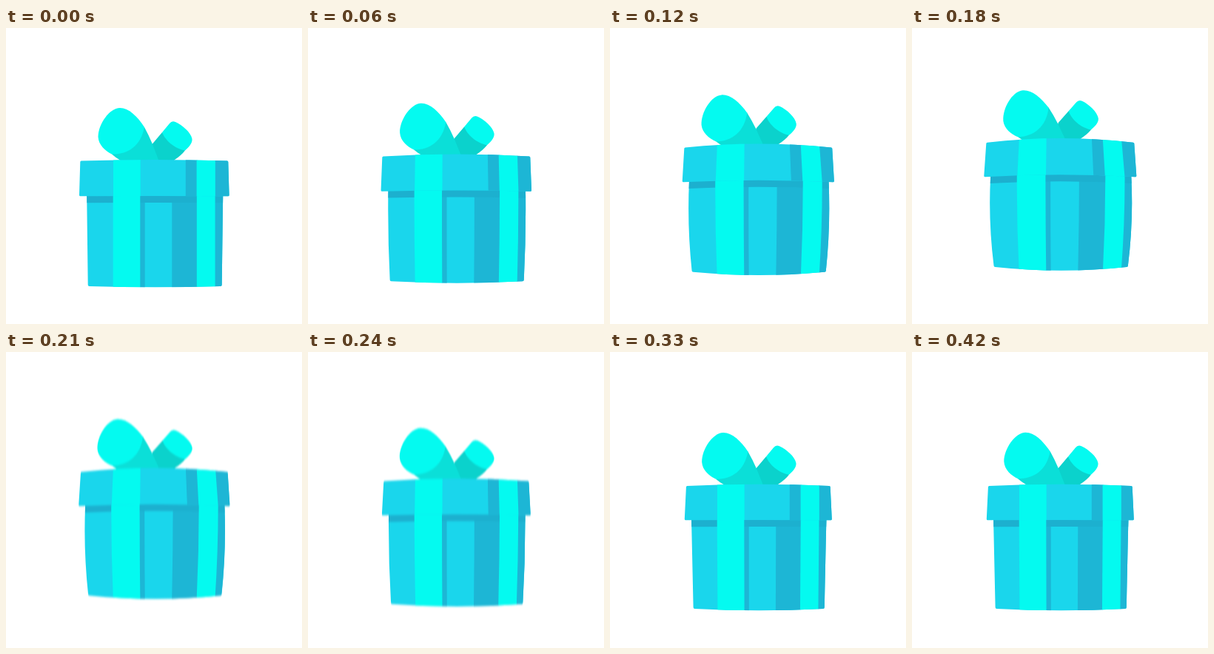
Recreate the animation shown at these times as an HTML page. Size 400x400 px, loop 0.54 s.

```html
<!DOCTYPE html>
<html lang="en">
<head>
<meta charset="utf-8">
<title>Gift box</title>
<style>
  html, body { margin: 0; width: 100%; height: 100%; overflow: hidden; background: #fff; }
  svg { display: block; width: 100%; height: 100%; }
</style>
</head>
<body>
<svg viewBox="0 0 400 400">
  <defs>
    <clipPath id="bodyClip"><path id="bodyEdge"/></clipPath>
    <clipPath id="lidClip"><path id="lidEdge"/></clipPath>
    <filter id="smear" filterUnits="userSpaceOnUse" x="0" y="0" width="400" height="400" color-interpolation-filters="sRGB">
      <feGaussianBlur id="smearAmount" stdDeviation="0"/>
    </filter>
  </defs>
  <g id="gift">
    <g id="bow">
      <g id="loopR">
        <path fill="#0bd2cc" d="M211 141L197.500 157L190 190H212L228 178Q237 172 242 165.500Z"/>
        <path fill="#04faf0" d="M211 141L221 129Q224 125 229 127C238 131 250 141 251.500 150C252 156 247 161 242 165.500C228 163 215 152 211 141Z"/>
      </g>
      <g id="loopL">
        <path fill="#0bdfd8" d="M187 134Q193 145 198 157L206 178L210 190H165L154 178.500Q148 175 143 170.500Z"/>
        <path fill="#04faf0" d="M124.500 147C124.500 130 140 108 154 108C166 108 177 119 187 134C182 160 164 171 143 170.500C134 166 125 158 124.500 147Z"/>
      </g>
    </g>
    <g id="body" clip-path="url(#bodyClip)"></g>
    <g id="lid" clip-path="url(#lidClip)"></g>
  </g>
</svg>
<script>
const LOOP = 540, STEP = 30, LAST = 420, PEAK = 180, LAND = 270;
const LIGHT = '#1ad6ec', DARK = '#1db6d5', SHADE = '#1cb0cf', RIBBON = '#04faf0';
const LID_X = 200.3, BODY_X = 201.2;

const $ = id => document.getElementById(id);
const span = (t, a, b) => Math.min(1, Math.max(0, (t - a) / (b - a)));
const ease = u => u * u * (3 - 2 * u);

function addPath(parent, attrs) {
  const p = document.createElementNS('http://www.w3.org/2000/svg', 'path');
  for (const k in attrs) p.setAttribute(k, attrs[k]);
  parent.appendChild(p);
  return p;
}

function addStrips(parent, list) {
  return list.map(([from, to, fill]) => ({ from, to, el: addPath(parent, { fill }) }));
}

const bodyStrips = addStrips($('body'), [
  [60, 340, LIGHT], [181, 187.7, DARK], [224.3, 258.5, DARK], [282, 340, DARK]
]);
const shade = addPath($('body'), { fill: 'none', stroke: SHADE, 'stroke-width': 18 });
bodyStrips.push(...addStrips($('body'), [[144.7, 181.3, RIBBON], [257.8, 282.6, RIBBON]]));
const lidStrips = addStrips($('lid'), [
  [60, 340, LIGHT], [242.8, 258.5, DARK], [282, 340, DARK],
  [145, 181.7, RIBBON], [257.6, 282.8, RIBBON]
]);

// box outline with slightly rounded corners and curved top, sides and base;
// top and base are { half, y, mid }: half width, corner height, middle height
function outline(cx, top, base, puff, r) {
  const l = cx - top.half, R = cx + top.half, bl = cx - base.half, bR = cx + base.half;
  const midY = (top.y + base.y) / 2, side = (top.half + base.half) / 2 + puff;
  return `M${l} ${top.y + r}Q${l} ${top.y} ${l + r} ${top.y}` +
    `Q${cx} ${2 * top.mid - top.y} ${R - r} ${top.y}Q${R} ${top.y} ${R} ${top.y + r}` +
    `Q${cx + side} ${midY} ${bR} ${base.y - r}Q${bR} ${base.y} ${bR - r} ${base.y}` +
    `Q${cx} ${2 * base.mid - base.y} ${bl + r} ${base.y}Q${bl} ${base.y} ${bl} ${base.y - r}` +
    `Q${cx - side} ${midY} ${l} ${top.y + r}Z`;
}

// vertical bands, spread sideways by s0 at the top and s1 at the bottom
function drawStrips(strips, y0, y1, s0, s1, puff) {
  const at = (x, s) => x + s * (x - 196) * .056;
  const mid = x => (at(x, s0) + at(x, s1)) / 2 + puff * (x - 200) / 92;
  const my = (y0 + y1) / 2;
  for (const { from, to, el } of strips) {
    el.setAttribute('d',
      `M${at(from, s0)} ${y0}H${at(to, s0)}Q${mid(to)} ${my} ${at(to, s1)} ${y1}` +
      `H${at(from, s1)}Q${mid(from)} ${my} ${at(from, s0)} ${y0}Z`);
  }
}

function draw(t) {
  const up = span(t, 0, PEAK), down = span(t, PEAK, LAND);
  const pinch = ease(down), hop = ease(up) - pinch;
  const settle = ease(span(t, LAND, LAST));
  const bulge = hop * (1.5 - .5 * hop), puff = 5.5 * bulge;
  const smear = 3.2 * (up * (1 - up) + 2 * down * (1 - down));

  const edge = (half, mid, sag) => ({ half, mid, y: mid + sag });
  const lidTop = edge(100 - 2.6 * pinch, 178 - 29 * hop + .8 * pinch, 1.5 + 4.2 * bulge + .6 * pinch);
  const lidBase = edge(101.3 + 1.7 * hop - 1.8 * pinch, 227 - 28.7 * hop, .3 + 2.7 * bulge);
  const bodyTop = edge(92 + 3 * hop - .8 * pinch, lidBase.mid - 4, lidBase.y - lidBase.mid);
  const sag = 1.2 + 3.6 * bulge + pinch;
  const bodyBase = edge(90.5 + .2 * hop - 1.9 * pinch, 349 - 26 * hop - 2 * pinch + sag, -sag);

  $('bodyEdge').setAttribute('d', outline(BODY_X, bodyTop, bodyBase, puff, 2));
  $('lidEdge').setAttribute('d', outline(LID_X, lidTop, lidBase, 0, 1.5));
  drawStrips(bodyStrips, lidBase.mid - 6, bodyBase.mid + 2, bulge, -.25 * pinch, puff * .6);
  drawStrips(lidStrips, lidTop.mid - 2, lidBase.y + 2, 0, bulge, 0);
  shade.setAttribute('d', `M${LID_X - lidBase.half} ${lidBase.y}` +
    `Q${LID_X} ${2 * lidBase.mid - lidBase.y} ${LID_X + lidBase.half} ${lidBase.y}`);

  const turn = -4.5 * hop - 1.4 * pinch + .8 * settle;
  $('bow').setAttribute('transform', `translate(0 ${lidTop.mid - 178 - .6 * pinch})`);
  $('loopL').setAttribute('transform', `translate(0 ${1.5 * hop}) rotate(${turn} 200 165)`);
  $('loopR').setAttribute('transform', `rotate(${1.5 * hop} 200 165)`);

  if (smear > .15) {
    $('smearAmount').setAttribute('stdDeviation', `.2 ${smear}`);
    $('gift').setAttribute('filter', 'url(#smear)');
  } else {
    $('gift').removeAttribute('filter');
  }
}

const start = performance.now();
function tick() {
  const t = (performance.now() - start) % LOOP;
  draw(Math.min(LAST, Math.floor(t / STEP) * STEP));
  requestAnimationFrame(tick);
}
tick();
</script>
</body>
</html>
```
